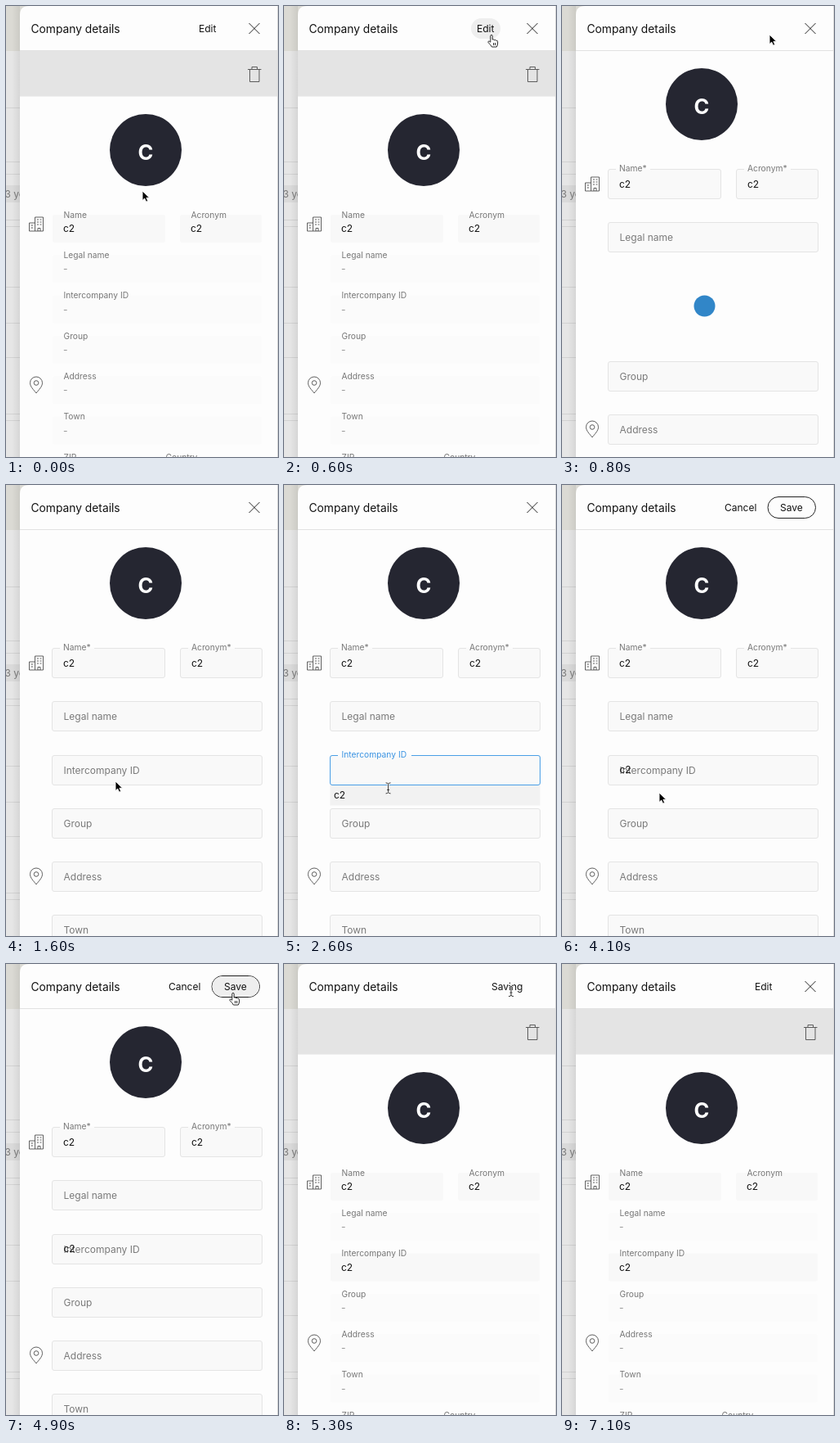
Write an HTML page that moves like this. It is 333 px wide and 551 px high and loops after 8000 ms.

```html
<!DOCTYPE html>
<html lang="en">
<head>
<meta charset="utf-8">
<title>Company details</title>
<style>
  html, body { margin: 0; width: 100%; height: 100%; overflow: hidden; background: #e6e6e6; }
  svg { display: block; width: 333px; height: 551px; }
  text { font: 12px Inter, Roboto, sans-serif; fill: #111; white-space: pre; }
  .title { font-size: 13.8px; }
  .small { font-size: 10.25px; fill: #777; }
  .hint { fill: #7a7a7a; }
  .none { fill: #999; }
  .avatar { font-size: 25.5px; font-weight: 700; fill: #fff; text-anchor: middle; }
  .line { fill: none; stroke: #222; stroke-width: 1; }
  .icon { fill: none; stroke: #444; stroke-width: .85; }
  .box { fill: #f9f9f9; stroke: #e4e4e4; }
  .focus { fill: #f9f9f9; stroke: #4a9fe6; }
  .hover { fill: #eee; }
</style>
</head>
<body>
<svg id="stage" viewBox="0 0 333 551"></svg>
<script>
const LOOP = 8000, STEP = 100;
const svg = document.getElementById('stage');

const text = (x, y, s, cls = '') => `<text x="${x}" y="${y}" class="${cls}">${s}</text>`;
const rect = (x, y, w, h, attrs) => `<rect x="${x}" y="${y}" width="${w}" height="${h}" ${attrs}/>`;
const path = (d, attrs = 'class="line"') => `<path d="${d}" ${attrs}/>`;
const icon = d => path(d, 'class="icon"');
const move = (x, y, body, id = '') => `<g id="${id}" transform="translate(${x} ${y})">${body}</g>`;
// "during" lists the spans of the loop in which a group is visible
const show = (during, body) => `<g data-on="${during}">${body}</g>`;

const building = y => move(37, y, icon(
  'M-8.5 8.5V-1.5H-1.5M-1.5 8.5V-8.5H8.5V8.5ZM-8.5 8.5H-1.5M2 8.5V5H5V8.5') +
  icon('M1 -5.5H3M4.5 -5.5H6.5M1 -2.5H3M4.5 -2.5H6.5M1 .5H3M4.5 .5H6.5M-6.5 1.5H-4M-6.5 4.5H-4'));
const pin = y => move(37, y, icon(
  'M0 10C-3 6-7.5 2-7.5-2.5A7.5 7.5 0 0 1 7.5-2.5C7.5 2 3 6 0 10Z') +
  '<circle cy="-2.5" r="2.8" class="icon"/>');
const avatar = y => `<circle cx="171" cy="${y}" r="44" fill="#252631"/>` + text(171, y + 12, 'C', 'avatar');

const viewField = (x, w, y, label, value) =>
  rect(x, y, w, 34, `rx="2" fill="${value === '-' ? '#fbfbfb' : '#f8f8f8'}"`) +
  text(x + 13.5, y + 3.7, label, 'small') +
  text(x + 13, y + 21, value, value === '-' ? 'none' : '');

const box = (x, w, y, cls = 'box') => rect(x + .5, y + .5, w - 1, 36, `rx="2.5" class="${cls}"`);
const emptyField = (y, label) => box(56, 258, y) + text(70.5, y + 22.8, label, 'hint');
const namedField = (x, w, label, gap) =>
  box(x, w, 199) + rect(x + 10, 198.5, gap, 2, 'fill="#fbfbfb"') +
  text(x + 14, 202.2, label, 'small') + text(x + 14, 222, 'c2');

const rowY = i => 255 + i * 49.3;
const lowerFields = ['Group', 'Address', 'Town'].map((s, i) => emptyField(395 + i * 65, s)).join('') + pin(478);

const backdrop =
  rect(0, 0, 333, 551, 'fill="#e6e6e6"') + rect(0, 0, 40, 55, 'fill="#dbdad4"') +
  [124, 190, 205, 261, 269, 343, 387, 429, 498, 506].map(y => rect(0, y, 17, 1, 'fill="#d2d2d2"')).join('') +
  rect(-6, 219, 23, 21, 'fill="#dadada"') + text(-1.5, 234, '3 years', 'hint') +
  rect(7, 0, 10, 551, 'fill="url(#shade)"') +
  path('M17 551V11Q17 0 28 0H333V551Z', 'fill="#fdfdfd"') +
  rect(332, 0, 1, 551, 'fill="#dcdcdc"');

const header = rect(17, 54, 315, 1, 'fill="#e2e2e2"') + text(30.5, 32.6, 'Company details', 'title') +
  show('0-3400 6100-8000', path('M297.5 21L310.5 34M310.5 21L297.5 34')) +
  show('500-800', rect(229, 15, 36, 25, 'rx="12.5" class="hover"')) +
  show('0-800 6100-8000', text(236, 32, 'Edit')) +
  show('3400-5300', text(199, 32, 'Cancel') +
    rect(252, 14.5, 58.5, 26, 'rx="13" class="line"') +
    show('4800-5300', rect(252.5, 15, 57.5, 25, 'rx="12.5" class="hover"')) +
    text(267, 32, 'Save')) +
  show('5300-6100', text(254, 32, 'Saving'));

const viewMode =
  rect(17, 55, 315, 55.5, 'fill="#e4e4e4"') +
  icon('M296 77.5H312.5M301 77V74.5H307.5V77M298.5 77.5V92.5H310V77.5') +
  avatar(176) + building(266.5) +
  viewField(57, 138, rowY(0), 'Name', 'c2') + viewField(213, 100, rowY(0), 'Acronym', 'c2') +
  viewField(57, 256, rowY(1), 'Legal name', '-') +
  show('0-800', viewField(57, 256, rowY(2), 'Intercompany ID', '-')) +
  show('5300-8000', viewField(57, 256, rowY(2), 'Intercompany ID', 'c2')) +
  ['Group', 'Address', 'Town'].map((s, i) => viewField(57, 256, rowY(i + 3), s, '-')).join('') +
  pin(463) + viewField(57, 111, rowY(6), 'ZIP', '') + viewField(182, 131, rowY(6), 'Country', '');

const editMode =
  avatar(120) + building(217.5) +
  namedField(56, 139, 'Name*', 42) + namedField(213, 101, 'Acronym*', 57) +
  emptyField(264, 'Legal name') +
  show('800-1200', '<circle cx="174.5" cy="366.5" r="13" fill="#3186c8"/>' + move(0, 39, lowerFields)) +
  show('1200-5300', lowerFields + box(56, 258, 330) +
    show('2300-3600', box(56, 258, 330, 'focus') + rect(66, 329.5, 90, 2, 'fill="#fbfbfb"')) +
    '<text id="float" x="70.5">Intercompany ID</text>' +
    show('3400-5300', text(70.5, 352, 'c2')) +
    show('2300-3400', rect(56.5, 367, 257, 24.5, 'id="option"') + text(61, 383, 'c2')));

const arrow = path('M0 0V11.6L2.7 9.1L4.6 13.2L6.7 12.3L4.9 8.3H8.6Z',
  'fill="#000" stroke="#fff" stroke-width=".9"');
const hand = path('M-1.2 9.2V1.6a1.2 1.2 0 0 1 2.4 0V6q2-.6 2.2.6 2-.6 2.2.6 2-.3 2 1.3v2.6' +
  'q-.2 2-1.3 3.9H.4Q-.8 12.6-3.9 9.6q-.7-1.4.7-1.6 1 0 2 1.2z',
  'fill="#fff" stroke="#111" stroke-width=".9"') + path('M2.6 10V13M4.7 10V13');
const beamPath = 'M-3-6.5Q0-6.5 0-5V5Q0 6.5-3 6.5M3-6.5Q0-6.5 0-5M0 5Q0 6.5 3 6.5M-1.5 2H1.5';
const beam = path(beamPath, 'fill="none" stroke="#fff" stroke-width="2.4"') +
  path(beamPath, 'fill="none" stroke="#333"');

svg.innerHTML =
  '<defs><linearGradient id="shade"><stop stop-color="#000" stop-opacity="0"/>' +
  '<stop offset="1" stop-color="#000" stop-opacity=".07"/></linearGradient></defs>' +
  backdrop + show('0-800 5300-8000', viewMode) + show('800-5300', editMode) + header +
  move(0, 0,
    show('0-500 800-1700 4100-4800 6100-7100', arrow) +
    show('500-800 2700-4100 4800-5300', hand) +
    show('1700-2700 5300-6100', beam), 'cursor');

// cursor stops: time, x, y
const stops = [
  [0, 167, 226], [600, 254, 35], [800, 254, 35], [1600, 134, 362],
  [2000, 133, 365], [2200, 133, 365], [3100, 120, 378], [3800, 118.5, 382],
  [4000, 118.5, 382], [4100, 119, 376], [4900, 278, 35], [5000, 278.5, 34],
  [5200, 278.5, 34], [5300, 278, 33], [6900, 278, 33], [7000, 268, 30], [LOOP, 268, 30]
];

const clamp = v => Math.min(1, Math.max(0, v));
const mix = (a, b, p) => a + (b - a) * p;
const ease = p => p * p * (3 - 2 * p);

function cursorAt(t) {
  const i = stops.findIndex(s => s[0] > t);
  const [t0, x0, y0] = stops[i - 1], [t1, x1, y1] = stops[i];
  const p = ease((t - t0) / (t1 - t0));
  return [mix(x0, x1, p), mix(y0, y1, p)];
}

const timed = [...svg.querySelectorAll('[data-on]')].map(node => ({
  node, spans: node.dataset.on.split(' ').map(s => s.split('-').map(Number))
}));
const cursor = document.getElementById('cursor');
const label = document.getElementById('float');
const option = document.getElementById('option');

function draw(t) {
  for (const { node, spans } of timed)
    node.style.display = spans.some(([a, b]) => t >= a && t < b) ? '' : 'none';

  const [x, y] = cursorAt(t);
  cursor.setAttribute('transform', `translate(${x} ${y})`);

  const up = clamp((t - 2200) / 200) * (1 - clamp((t - 3500) / 300));
  label.setAttribute('y', mix(352.6, 333, up));
  label.style.fontSize = mix(12, 10.25, up) + 'px';
  label.style.fill = t >= 2300 && t < 3600 ? '#3a93e2' : '#7a7a7a';
  option.style.fill = t >= 2700 ? '#d4d4d4' : '#f2f2f2';
}

const start = performance.now();
function tick() {
  const t = (performance.now() - start) % LOOP;
  draw(Math.floor(t / STEP) * STEP);
  requestAnimationFrame(tick);
}
tick();
</script>
</body>
</html>
```
